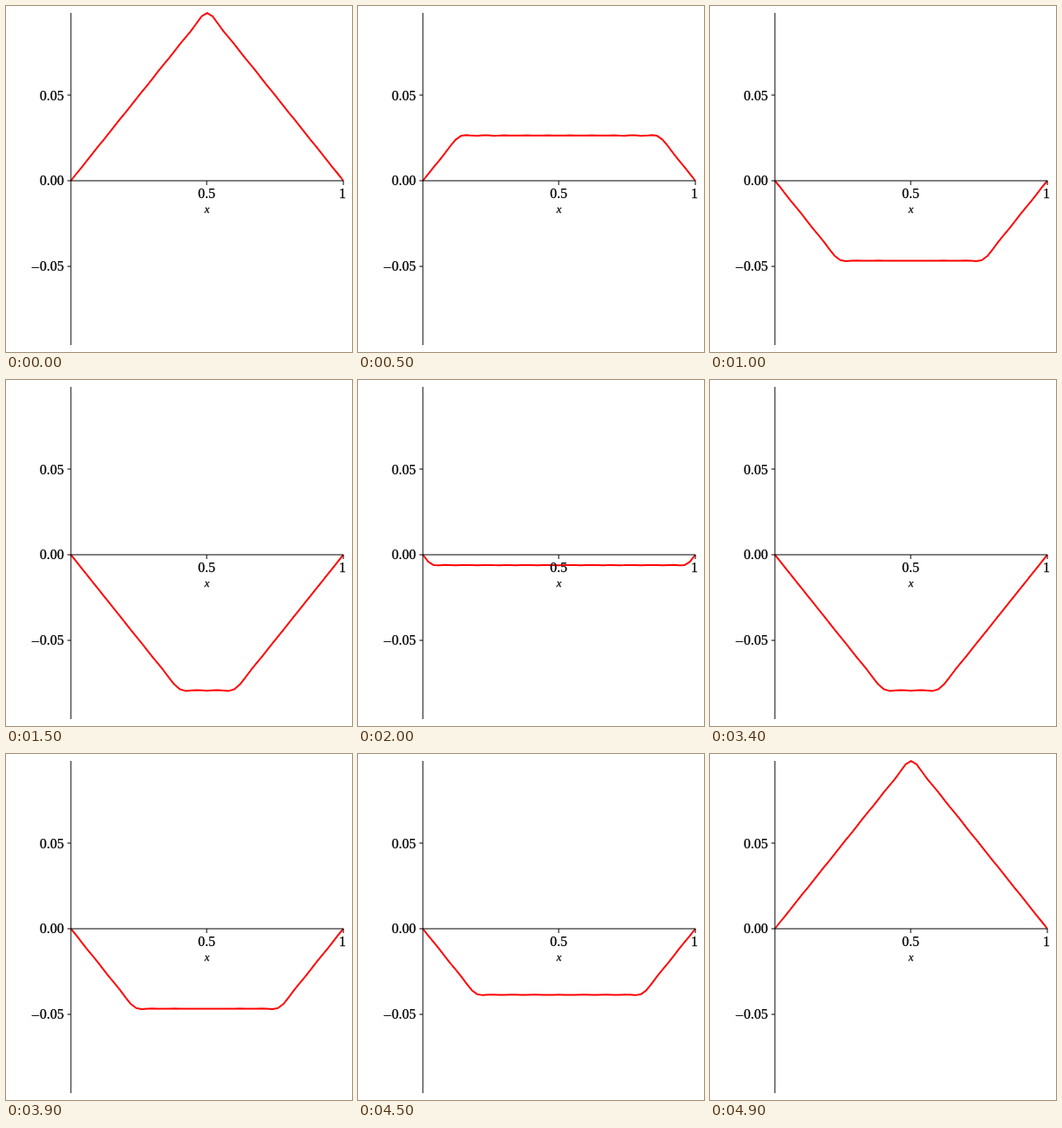
Write an HTML page that moves like this. It is 400 by 400 pixels and loops after 5 s.

```html
<!DOCTYPE html>
<html lang="en">
<head>
<meta charset="utf-8">
<title>Plucked string</title>
<style>
  html, body { margin: 0; width: 100%; height: 100%; overflow: hidden; background: #fff; }
  svg { display: block; width: 400px; height: 400px; }
  text { font: 16px "Liberation Serif", "Times New Roman", serif; stroke: #000; stroke-width: .25px; }
  .end { text-anchor: end; }
  .mid { text-anchor: middle; }
  .name { font-size: 13px; font-style: italic; }
</style>
</head>
<body>
<svg viewBox="0 0 400 400">
  <polyline id="string" fill="none" stroke="#f00" stroke-width="2" stroke-linejoin="round"/>
  <path d="M75 8V392M75 202H390M71 103H75M71 202H75M71 301H75M232 202V207M390 202V207"
        stroke="#000" fill="none"/>
  <text class="end" x="67" y="109">0.05</text>
  <text class="end" x="67" y="207">0.00</text>
  <text class="end" x="67" y="306">–<tspan dx="1">0.05</tspan></text>
  <text class="mid" x="232" y="222">0.5</text>
  <text class="mid" x="389" y="222">1</text>
  <text class="mid name" x="232.5" y="239">x</text>
</svg>
<script>
  const LOOP = 5000, STEP = 100, POINTS = 50, LAST_MODE = 25;
  const LAST = LOOP / STEP - 1, CYCLES = 8;
  const string = document.getElementById('string');

  // Truncated Fourier series of a string plucked at its middle, height 0.1
  function height(x, phase) {
    let sum = 0;
    for (let n = 1; n <= LAST_MODE; n += 2) {
      sum += Math.sin(n * Math.PI / 2) * Math.sin(n * Math.PI * x) * Math.cos(n * phase) / (n * n);
    }
    return 0.8 / Math.PI ** 2 * sum;
  }

  function draw() {
    const step = Math.floor(performance.now() % LOOP / STEP);
    const phase = 2 * Math.PI * CYCLES * step / LAST;
    const points = [];
    for (let i = 0; i <= POINTS; i++) {
      const x = i / POINTS;
      points.push(`${(75 + 315 * x).toFixed(2)},${(202 - 1970 * height(x, phase)).toFixed(2)}`);
    }
    string.setAttribute('points', points.join(' '));
    requestAnimationFrame(draw);
  }
  draw();
</script>
</body>
</html>
```
